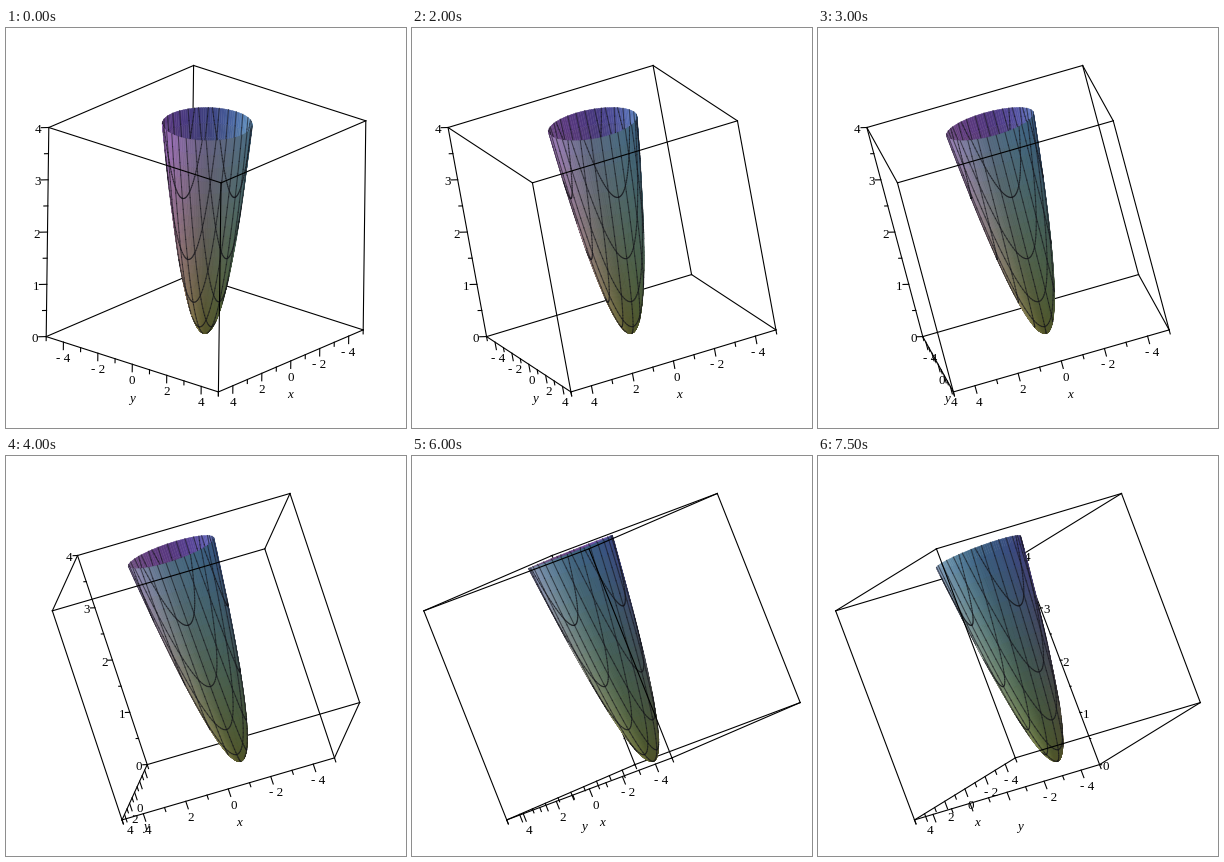
A matplotlib script for the animation above (8000 ms loop, 400 px wide and 400 px high).

```python
import numpy as np
import matplotlib.pyplot as plt
from matplotlib.animation import FuncAnimation
from matplotlib.collections import LineCollection, PolyCollection

SIZE, DPI = 400, 100
FRAMES, INTERVAL = 16, 500
CENTER = np.array([200.0, 200.7])
SIDE = 225.0                              # edge of the plot cube in pixels
START, STEP = -1.8, 360 / 49              # turn about the vertical screen axis
PX = 72 / DPI

# The screen's downward axis stays fixed while the cube turns around it.
DOWN = np.array([62.0, 55.3, -209.0])
DOWN /= np.linalg.norm(DOWN)
SIDE_U = np.array([-DOWN[1], DOWN[0], 0]) / np.hypot(DOWN[0], DOWN[1])
SIDE_V = np.cross(SIDE_U, DOWN)

fig = plt.figure(figsize=(SIZE / DPI, SIZE / DPI), dpi=DPI, facecolor="white")
ax = fig.add_axes([0, 0, 1, 1])


def cube(x, y, z):
    """Data coordinates to the unit cube centred on the origin."""
    x, y, z = np.broadcast_arrays(x, y, z)
    return np.stack([x / 10, y / 10, z / 4 - 0.5], axis=-1)


def normals(x, y):
    n = np.stack([5 * x, 5 * y, -np.ones_like(x)], axis=-1)
    return n / np.linalg.norm(n, axis=-1, keepdims=True)


def paraboloid(rings=28, sectors=120):
    """Quads, normals and base colours of z = x^2 + y^2 up to z = 4."""
    r, t = np.meshgrid(np.linspace(0, 2, rings + 1),
                       np.linspace(0, 2 * np.pi, sectors + 1), indexing="ij")
    p = cube(r * np.cos(t), r * np.sin(t), r * r)
    quads = np.stack([p[:-1, :-1], p[1:, :-1], p[1:, 1:], p[:-1, 1:]], axis=2)
    rm = (r[:-1, :-1] + r[1:, 1:]) / 2
    tm = (t[:-1, :-1] + t[1:, 1:]) / 2
    x, y = rm * np.cos(tm), rm * np.sin(tm)
    base = np.stack([0.5 + 0.08 * x, 0.5 + 0.08 * y,
                     0.25 + 0.55 * rm ** 2 / 4], axis=-1)
    return quads.reshape(-1, 4, 3), normals(x, y).reshape(-1, 3), base.reshape(-1, 3)


def grid_lines():
    """Short segments of the curves x = const and y = const."""
    segs, norms = [], []
    for c in np.arange(-4, 5) * 10 / 24:
        s = np.linspace(-1, 1, 61) * np.sqrt(4 - c * c)
        k = np.full_like(s, c)
        for x, y in ((k, s), (s, k)):
            p = cube(x, y, x * x + y * y)
            segs.append(np.stack([p[:-1], p[1:]], axis=1))
            norms.append(normals((x[:-1] + x[1:]) / 2, (y[:-1] + y[1:]) / 2))
    return np.concatenate(segs), np.concatenate(norms)


QUADS, QUAD_N, BASE = paraboloid()
SEGS, SEG_N = grid_lines()
CORNERS = np.array([(x, y, z) for x in (-.5, .5) for y in (-.5, .5) for z in (-.5, .5)])
EDGES = [(i, j) for i in range(8) for j in range(i + 1, 8)
         if np.abs(CORNERS[i] - CORNERS[j]).sum() == 1]


def draw_lines(segs, z, color="black", width=1.1):
    ax.add_collection(LineCollection(segs, colors=[color], linewidths=width * PX,
                                     zorder=z, capstyle="projecting" if z != 3 else "butt"))


def label(pos, text, italic=False):
    ax.text(pos[0], pos[1], text, fontsize=13 * PX, family="Liberation Serif",
            style="italic" if italic else "normal", ha="center",
            va="center_baseline", zorder=1)


def number(v):
    return f"- {-v}" if v < 0 else str(v)


def y_numbers(i):
    """Numbers on the y axis that find room at this turn."""
    if i <= 5:
        return (-4, -2, 0, 2, 4)
    if i <= 7:
        return (-4, 0, 4)
    if i <= 9:
        return (0, 2, 4)
    return () if i <= 12 else (-4, -2)


def draw_axes(i, project, direction):
    ticks = []
    drop = direction(np.array([0, 0, -1.0]))
    drop = drop / drop[1]
    for name, shown in (("x", (-4, -2, 0, 2, 4)), ("y", y_numbers(i))):
        def at(v):
            return project(cube(v, 5, 0) if name == "x" else cube(5, v, 0))
        for v in range(-5, 6):
            p = at(v)
            ticks.append([p, p + drop * (4 if v % 2 else 7.5)])
            if v in shown:
                label(p + drop * 15.5, number(v))
        label(at(0) + drop * 33, name, italic=True)

    out = direction(np.array([1, -1, 0]) / np.sqrt(2))
    for h in range(9):
        p = project(cube(5, -5, h / 2))
        ticks.append([p, p + out * (4 if h % 2 else 7.5)])
        if h % 2 == 0 and abs(out[0]) > 0.2:
            label(p + out * 7 + np.array([np.sign(out[0]) * 4, 1]), str(h // 2))
    draw_lines(ticks, 1)


def draw(i):
    ax.clear()
    ax.set_xlim(0, SIZE)
    ax.set_ylim(SIZE, 0)
    ax.axis("off")

    a = np.radians(START + STEP * i)
    right = np.cos(a) * SIDE_U + np.sin(a) * SIDE_V
    toward = np.cross(right, -DOWN)
    axes2d = np.stack([right, DOWN], axis=1)

    def direction(v):
        return v @ axes2d

    def project(p):
        return CENTER + SIDE * (p @ axes2d)

    draw_axes(i, project, direction)

    # The three edges at the farthest corner lie behind the surface.
    far = int(np.argmin(CORNERS @ toward))
    pts = project(CORNERS)
    draw_lines([pts[list(e)] for e in EDGES if far in e], 1)
    draw_lines([pts[list(e)] for e in EDGES if far not in e], 6)

    # Inside of the cup first, then its outside; lit from the viewer's left.
    facing, seg_facing = QUAD_N @ toward > 0, SEG_N @ toward > 0
    quads, segs = project(QUADS), project(SEGS)
    for z, outside in ((2, False), (4, True)):
        m = facing == outside
        lit = np.clip((QUAD_N[m] @ -right) * (1 if outside else -1), 0, 1)[:, None]
        colors = np.clip(BASE[m] * (0.64 + 0.25 * lit) + 0.08 * lit ** 2, 0, 1)
        ax.add_collection(PolyCollection(quads[m], facecolors=colors, edgecolors=colors,
                                         linewidths=0.3, zorder=z))
        draw_lines(segs[seg_facing == outside], z + 0.5, (0.08, 0.08, 0.1, 0.6), 1.1)
    return []


anim = FuncAnimation(fig, draw, frames=FRAMES, interval=INTERVAL,
                     init_func=lambda: [], repeat=True, repeat_delay=0)
plt.show()
```
